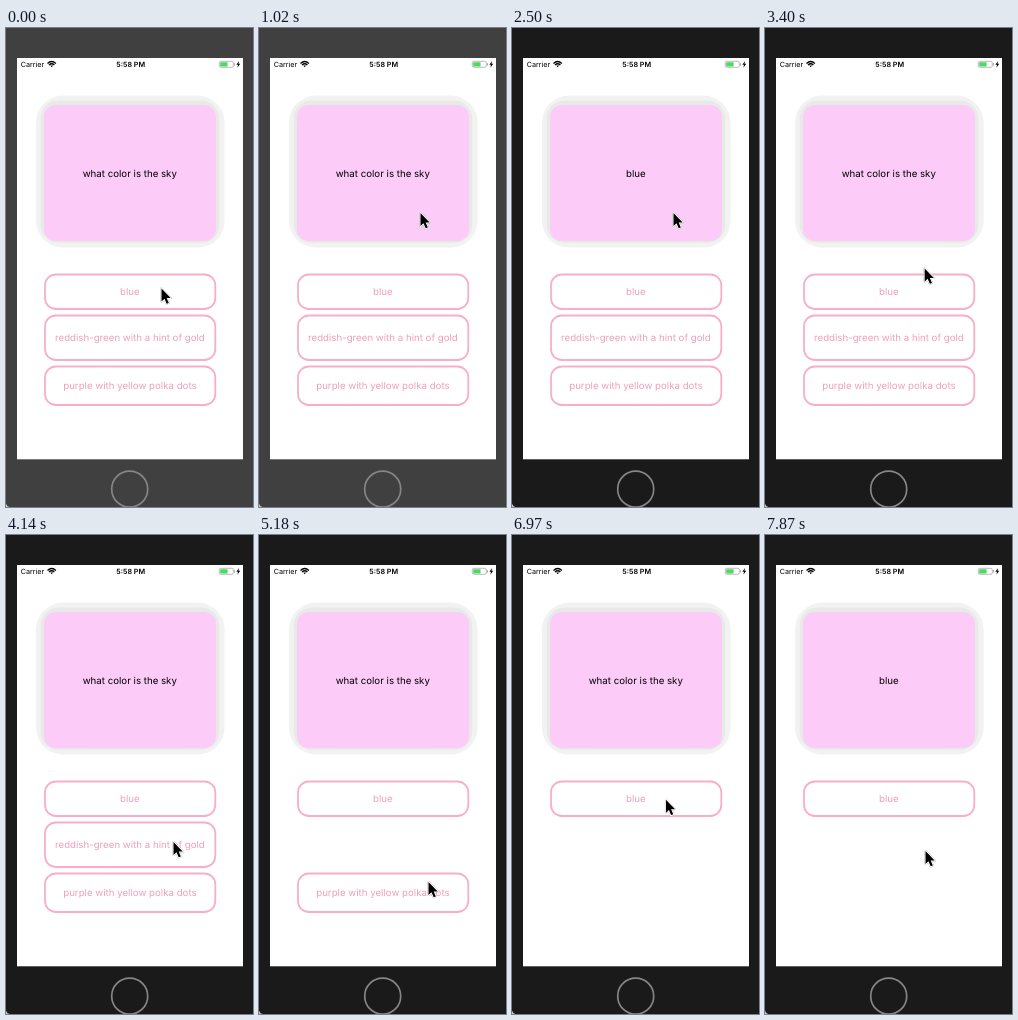
Write an HTML page that moves like this. It is 247x479 px and loops after 8 s.

```html
<!DOCTYPE html>
<html lang="en">
<head>
<meta charset="utf-8">
<title>Quiz card</title>
<style>
  html, body { margin: 0; width: 100%; height: 100%; overflow: hidden; background: #1a1a1a; }
  svg { display: block; width: 247px; height: 479px; }
  text { font: 9.7px Inter, Roboto, sans-serif; text-anchor: middle; text-rendering: geometricPrecision; }
  .status text { font-size: 7.2px; text-anchor: start; }
  .status .clock { font-weight: 600; text-anchor: middle; }
  .option rect { fill: #fff; stroke: #f8aecb; stroke-width: 1.8; }
  .option text { fill: #ee9fbc; }
  #cursor { filter: drop-shadow(0 .6px .7px #0008); }
</style>
</head>
<body>
<svg viewBox="0 0 247 479">
  <rect id="bezel" width="247" height="479"/>
  <path d="M0 475.5Q.6 478.4 3.5 479H0z" fill="#ccc"/>
  <rect x="11" y="30" width="226" height="401.3" fill="#fff"/>
  <circle cx="123.7" cy="461.2" r="18" fill="none" stroke="#868686" stroke-width="1.7"/>

  <g class="status">
    <text x="14.7" y="38.7">Carrier</text>
    <g fill="none" stroke="#000" stroke-width="1.3">
      <path d="M41.5 35.4Q45.7 31.6 49.9 35.4M43 37Q45.7 34.6 48.4 37"/>
      <path d="M44.3 37.6L45.7 39.2L47.1 37.6z" fill="#000" stroke="none"/>
    </g>
    <text class="clock" x="124.7" y="38.7">5:58 PM</text>
    <rect x="213.3" y="33.3" width="14" height="6" rx="1.5" fill="#fff" stroke="#aaa" stroke-width=".8"/>
    <rect x="214.2" y="34.2" width="7.4" height="4.2" rx=".6" fill="#4cd964"/>
    <path d="M228.5 35.2V37.6" stroke="#aaa"/>
    <path d="M233 33L230.4 36.7H232L231.4 39.8L234.2 35.8H232.5z"/>
  </g>

  <rect x="30" y="67.6" width="188.6" height="152" rx="27" fill="#f2f2f2"/>
  <rect x="34.6" y="72.4" width="178.6" height="142.4" rx="18" fill="#e8eae8"/>
  <rect x="38" y="77" width="172" height="136" rx="12" fill="#fccbf8"/>
  <text id="card" x="123.8" y="149.1"></text>

  <g id="options"></g>
  <g id="cursor">
    <path d="M1 1.4V14.6L4 11.8L6.2 16.8L8.3 15.9L6.2 11H10.2z"
          stroke="#fff" stroke-width="2" stroke-linejoin="round" paint-order="stroke"/>
  </g>
</svg>
<script>
const LOOP = 8000, TICK = 148.9, LEAD = 32;   // everything below is timed in ticks
const ACTIVE = 8;
const FLIPS = [9, 12, 17, 19, 49];
const GAP = 6.5;
const $ = id => document.getElementById(id);

const options = [
  { label: 'blue', h: 34.5, gone: Infinity },
  { label: 'reddish-green with a hint of gold', h: 44.5, gone: 30 },
  { label: 'purple with yellow polka dots', h: 38.5, gone: 38 }
];
let top_ = 246.5;
$('options').innerHTML = options.map(({ label, h }) => {
  const y = top_;
  top_ += h + GAP;
  return `<g class="option"><rect x="39" y="${y}" width="170.3" height="${h}" rx="11"/>
    <text x="123.9" y="${y + h / 2 + 3.7}">${label}</text></g>`;
}).join('');
const buttons = $('options').children;

const start = { x: 154.5, y: 259 };
const moves = [
  { at: 7, lasts: 7, x: 160.5, y: 183.5 },   // to the card
  { at: 24, lasts: 3, x: 158, y: 258.5 },    // down to the options
  { at: 28, lasts: 3, x: 166.5, y: 305.5 },
  { at: 35, lasts: 3, x: 168.5, y: 345.5 },
  { at: 48, lasts: 7, x: 152, y: 258.5 },    // back up to the first option
  { at: 53, lasts: 1, x: 159.5, y: 314.5 }
];

function pointerAt(k) {
  let { x, y } = start;
  for (const m of moves) {
    const p = Math.min(1, Math.max(0, (k - m.at) / m.lasts + 1));
    const e = p * p * (3 - 2 * p);
    x += (m.x - x) * e;
    y += (m.y - y) * e;
  }
  return [x, y];
}

function draw(now) {
  const k = Math.floor((now % LOOP + LEAD) / TICK);
  const flipped = FLIPS.filter(f => f <= k).length % 2;
  $('bezel').setAttribute('fill', k < ACTIVE ? '#404040' : '#1a1a1a');
  $('card').textContent = flipped ? 'blue' : 'what color is the sky';
  options.forEach((o, i) => buttons[i].style.display = k < o.gone ? '' : 'none');
  $('cursor').setAttribute('transform', `translate(${pointerAt(k)})`);
  requestAnimationFrame(draw);
}
draw(0);
</script>
</body>
</html>
```
